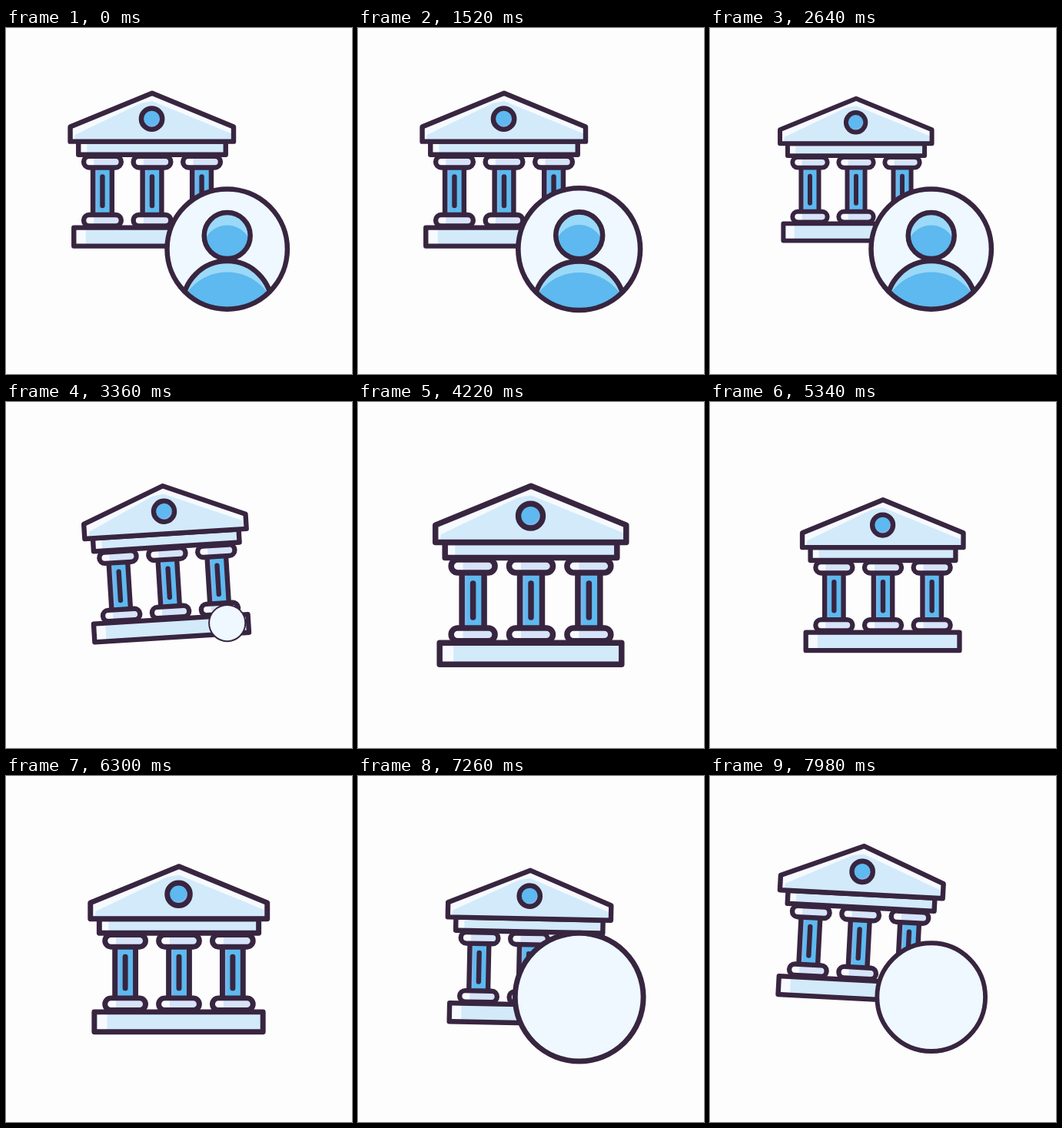
An HTML page with a canvas for the animation above (8000 ms loop, 450 px wide and 450 px high).

```html
<!DOCTYPE html>
<html lang="en">
<head>
<meta charset="utf-8">
<title>Bank and customer</title>
<style>
html, body { margin: 0; width: 100%; height: 100%; overflow: hidden; background: #fdfdfd; }
canvas { display: block; width: 450px; height: 450px; }
</style>
</head>
<body>
<canvas id="stage"></canvas>
<script>
const SIZE = 450, LOOP = 8000;
const INK = '#382540', PAPER = '#fdfdfd', DISC = '#eef8fe';
const PALE = '#f6fafe', ICE = '#d3eafa', LILAC = '#d6e3f8';
const BLUE = '#5db9ef', SKY = '#9bd9f8', DUSK = '#7fb4ea';

const canvas = document.getElementById('stage');
const ctx = canvas.getContext('2d');
const dpr = window.devicePixelRatio || 1;
canvas.width = canvas.height = SIZE * dpr;

const span = (n, a, b) => Math.min(1, Math.max(0, (n - a) / (b - a)));
const ease = u => (1 - Math.cos(Math.PI * u)) / 2;
const cubicOut = u => 1 - (1 - u) ** 3;
const backIn = u => u * u * (3.6 * u - 2.6);
const bump = u => Math.sin(Math.PI * u) ** 2;
const lean = u => Math.sin(Math.PI * u ** 1.3);
const wobble = u => Math.sin(2 * Math.PI * u ** 1.5) * (1 - u);

// The motion advances in uneven beats: short, long, short.
function stepAt(ms) {
  const r = ms % 140;
  return 3 * Math.floor(ms / 140) + (r < 20 ? 0 : r < 120 ? 1 : 2);
}

function bankPose(n) {
  const go = span(n, 60, 82), back = span(n, 150, 178);
  const away = ease(go) - ease(back);
  return {
    x: 190 + 35 * away,
    y: 184 + 41 * away,
    tilt: 3.6 * (lean(back) - lean(go)),
    scale: 0.855 - 0.012 * away - 0.06 * bump(span(n, 44, 68))
      + 0.195 * bump(span(n, 78, 115)) + 0.085 * bump(span(n, 115, 160))
  };
}

function ringScale(n) {
  if (n < 56) return 1 + 0.3 * wobble(span(n, 31, 55));
  if (n < 100) return 1 - backIn(span(n, 56, 73));
  return 1.15 * cubicOut(span(n, 148, 160)) - 0.25 * ease(span(n, 160, 171));
}

function poly(...pts) {
  const p = new Path2D();
  for (let i = 0; i < pts.length; i += 2) p.lineTo(pts[i], pts[i + 1]);
  p.closePath();
  return p;
}

function box(x, y, w, h, r = 0) {
  const p = new Path2D();
  p.roundRect(x, y, w, h, r);
  return p;
}

function circle(x, y, r) {
  const p = new Path2D();
  p.arc(x, y, r, 0, Math.PI * 2);
  return p;
}

// Fills a shape, lays a second tone inside it, then outlines it.
function part(shape, base, tone, toneShape) {
  ctx.fillStyle = base;
  ctx.fill(shape);
  ctx.save();
  ctx.clip(shape);
  ctx.fillStyle = tone;
  ctx.fill(toneShape);
  ctx.restore();
  ctx.stroke(shape);
}

function drawColumn(x) {
  part(box(x - 14.5, 218, 29, 80), DUSK, BLUE, box(x - 8, 218, 24, 80));
  ctx.beginPath();
  ctx.moveTo(x, 236);
  ctx.lineTo(x, 280);
  ctx.stroke();
  for (const y of [205, 294]) {
    part(box(x - 28.5, y, 57, 17, 8.5), PALE, LILAC, box(x - 13, y, 42, 17));
  }
}

function drawBank({ x, y, scale, tilt }) {
  ctx.save();
  ctx.translate(x, y);
  ctx.rotate(tilt * Math.PI / 180);
  ctx.scale(scale, scale);
  ctx.translate(-225, -225);
  ctx.lineWidth = 7.5;
  for (let i = -1; i <= 1; i++) drawColumn(225 + 75.5 * i);
  part(box(113, 182.5, 224, 20), PALE, ICE, box(126, 180, 212, 24));
  part(box(106, 313.5, 237, 28), PALE, ICE, box(124, 312, 220, 30));
  part(poly(225, 109, 349, 160, 349, 182.5, 100.5, 182.5, 100.5, 160), PALE, ICE,
    poly(208, 124, 225, 121, 350, 172, 350, 184, 106, 184, 108, 172));
  part(circle(224.5, 148, 16), DUSK, BLUE, circle(222, 144, 14));
  ctx.restore();
}

function drawPerson(scale) {
  ctx.save();
  ctx.scale(scale, scale);
  part(circle(0, 73.5, 58), SKY, BLUE, circle(0, 95, 65));
  part(circle(0, -17.5, 30), SKY, BLUE, circle(0, 1, 32));
  ctx.restore();
}

function drawRing(scale, person) {
  if (scale < 0.01) return;
  const disc = circle(0, 0, 78.2);
  ctx.save();
  ctx.translate(287.7, 287.6);
  ctx.scale(scale, scale);
  ctx.lineWidth = 6.5;
  ctx.fillStyle = DISC;
  ctx.fill(disc);
  if (person > 0.01) {
    ctx.save();
    ctx.clip(disc);
    drawPerson(person);
    ctx.restore();
  }
  ctx.stroke(disc);
  ctx.restore();
}

function draw(ms) {
  const n = stepAt(ms);
  ctx.setTransform(dpr, 0, 0, dpr, 0, 0);
  ctx.fillStyle = PAPER;
  ctx.fillRect(0, 0, SIZE, SIZE);
  ctx.strokeStyle = INK;
  ctx.lineJoin = ctx.lineCap = 'round';
  drawBank(bankPose(n));
  drawRing(ringScale(n), 1 - backIn(span(n, 56, 67)));
}

function tick() {
  draw(performance.now() % LOOP);
  requestAnimationFrame(tick);
}
tick();
</script>
</body>
</html>
```
